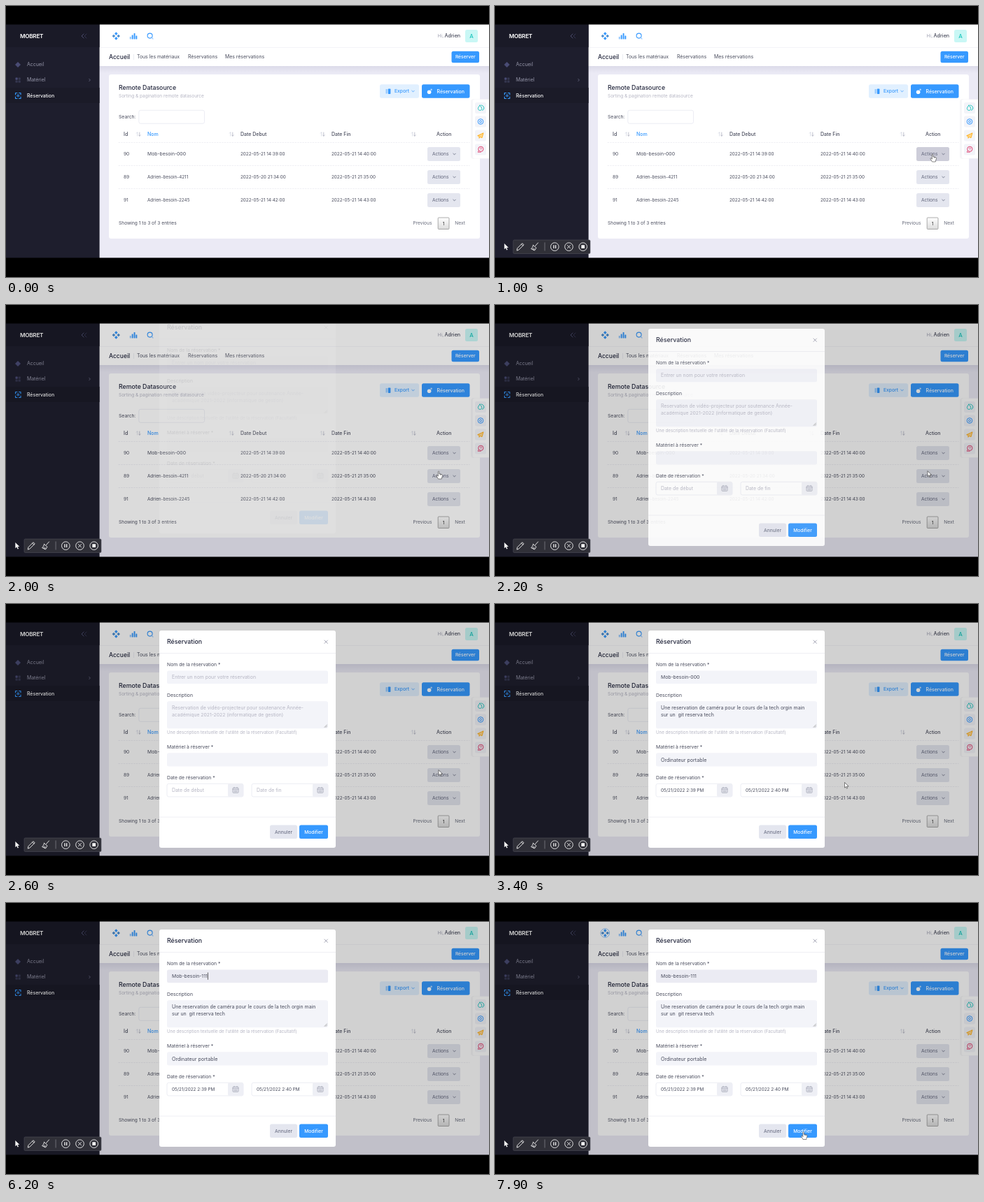
Animation of 690 by 388 pixels, one loop 8000 ms. Source, as an HTML page:

```html
<!DOCTYPE html>
<html lang="fr">
<head>
<meta charset="utf-8">
<title>Réservations</title>
<style>
html, body { margin: 0; width: 100%; height: 100%; overflow: hidden; background: #000; }
svg { display: block; width: 100%; height: 100%; }
text { font-family: Inter, "Open Sans", sans-serif; white-space: pre; }
</style>
</head>
<body>
<svg id="stage" viewBox="0 0 690 388" xmlns="http://www.w3.org/2000/svg"></svg>
<script>
const INK = '#484b5c', DARK = '#20243a', MUTED = '#b5b5c3', BLUE = '#3699ff', LINE = '#e8e9f0', GREY = '#e4e6ef', SOFT = '#f3f4f9';

const rect = (x, y, w, h, fill, r = 0, more = '') =>
  `<rect x="${x}" y="${y}" width="${w}" height="${h}" rx="${r}" fill="${fill}" ${more}/>`;
// y is the middle of the capitals
const text = (x, y, str, size = 6.8, fill = INK, weight = 400, more = '') =>
  `<text x="${x}" y="${y + size * 0.36}" font-size="${size}" fill="${fill}" font-weight="${weight}" ${more}>${str}</text>`;
const path = (d, stroke, width = 0.8, fill = 'none', more = '') =>
  `<path d="${d}" stroke="${stroke}" stroke-width="${width}" fill="${fill}" stroke-linecap="round" stroke-linejoin="round" ${more}/>`;
const dot = (x, y, r, fill, more = '') => `<circle cx="${x}" cy="${y}" r="${r}" fill="${fill}" ${more}/>`;
const ring = (x, y, r, color, w = 0.9) => dot(x, y, r, 'none', `stroke="${color}" stroke-width="${w}"`);
const chevron = (x, y, color) => path(`M${x - 1.7} ${y - 0.8}l1.7 1.7 1.7-1.7`, color);
const group = (id, body, more = '') => `<g id="${id}" ${more}>${body}</g>`;
const diamond = (x, y, r) => `M${x} ${y - r}l${r} ${r} ${-r} ${r} ${-r} ${-r}z`;

function sidebar() {
  return rect(0, 26, 133.6, 335, '#1e1e2d') + rect(0, 26, 133.6, 33, '#1a1a27') + rect(0, 117, 133.6, 22, '#1b1b28')
    + text(20, 43, 'MOBRET', 8.2, '#fff', 600, 'letter-spacing="-.3"')
    + path('M111 40l-3 3 3 3', '#5a5c82') + path('M115 40l-3 3 3 3', '#3a3c5c')
    + path(diamond(17, 84, 4), 'none', 0, '#494b74')
    + text(30, 84, 'Accueil', 6.9, '#9899ac')
    + rect(13.5, 102.5, 3.2, 3.2, '#494b74', 0.6) + rect(17.6, 102.5, 3.2, 3.2, '#34364f', 0.6)
    + rect(13.5, 106.6, 3.2, 3.2, '#34364f', 0.6) + rect(17.6, 106.6, 3.2, 3.2, '#34364f', 0.6)
    + text(30, 106, 'Matériel', 6.9, '#9899ac')
    + path('M118.7 104.3l1.7 1.7-1.7 1.7', '#6b6d86')
    + path('M13.5 127v-2.5h2.5M18.5 124.5h2.5v2.5M21 130v2.5h-2.5M16 132.5h-2.5V130', BLUE, 1.1)
    + rect(15.4, 126.6, 3.7, 3.7, BLUE, 0.7, 'opacity=".6"')
    + text(30, 128.3, 'Réservation', 6.9, '#fff', 500);
}

function header() {
  const nav = [[187, 'Tous les matériaux'], [260, 'Réservations'], [313, 'Mes réservations']];
  return rect(133, 26, 557, 60, '#fff') + rect(133, 59, 557, 0.7, '#eff0f5')
    + rect(133, 86, 557, 10, 'url(#shade)')
    + path(diamond(157.3, 39.6, 2.3) + diamond(157.3, 46.4, 2.3), 'none', 0, BLUE)
    + path(diamond(153.9, 43, 2.3) + diamond(160.7, 43, 2.3), 'none', 0, '#4c8fd0')
    + group('halo', ring(157.3, 43, 6.3, '#6fb4fb', 0.8))
    + rect(176.8, 44, 1.9, 3.6, '#8cc4ff', 0.5) + rect(179.7, 41.5, 1.9, 6.1, BLUE, 0.5)
    + rect(182.6, 39, 1.9, 8.6, BLUE, 0.5) + rect(185.4, 42.5, 1.9, 5.1, BLUE, 0.5)
    + ring(205.6, 42.6, 3.5, BLUE, 1.1) + path('M208.3 45.3l1.7 1.8', '#8cc4ff', 1.1)
    + text(616.5, 42.8, 'Hi,', 6.8, '#a1a2b3') + text(626.5, 42.8, 'Adrien', 7.2, INK, 500)
    + rect(656, 34, 18, 18, '#c9f7f5', 2.5) + text(665, 43, 'A', 7.8, '#1bc5bd', 500, 'text-anchor="middle"')
    + text(147, 73, 'Accueil', 8.5, DARK, 500) + rect(182, 69, 0.6, 8, '#e0e2ea')
    + nav.map(([x, s]) => text(x, 73, s, 6.9)).join('')
    + rect(636.5, 64.7, 39.5, 16.6, BLUE, 2.5) + text(656.2, 73, 'Réserver', 6.7, '#fff', 500, 'text-anchor="middle"');
}

const sorter = x => path(`M${x - 1.5} 186v-5.2m-1.3 1.4l1.3-1.4 1.3 1.4`, '#d5d7e2', 0.7)
  + path(`M${x + 1.8} 181v5.2m-1.3-1.4l1.3 1.4 1.3-1.4`, '#a9abba', 0.7);

function card() {
  const heads = [[168, 'Id', INK], [202, 'Nom', BLUE], [335, 'Date Debut', INK], [465, 'Date Fin', INK], [615, 'Action', INK]];
  const rows = [
    ['90', 'Mob-besoin-000', '2022-05-21 14:39:00', '2022-05-21 14:40:00'],
    ['89', 'Adrien-besoin-4211', '2022-05-20 21:34:00', '2022-05-21 21:35:00'],
    ['91', 'Adrien-besoin-2245', '2022-05-21 14:42:00', '2022-05-21 14:43:00']
  ];
  let s = rect(147, 98, 530, 235, '#fff', 3)
    + text(161, 117, 'Remote Datasource', 8.75, DARK, 500)
    + text(161, 128.5, 'Sorting &amp; pagination remote datasource', 6.5, MUTED)
    + rect(534, 112.2, 56, 19.6, '#e1f0ff', 2.5) + rect(542.5, 119, 2.4, 6.5, '#9accff', 0.5) + rect(545.8, 118.5, 3.6, 7.5, BLUE, 0.7)
    + text(555, 122, 'Export', 6.75, BLUE, 500) + chevron(581.5, 122, BLUE)
    + rect(594, 112.2, 68.5, 19.6, BLUE, 2.5) + dot(604.6, 123.3, 2.8, '#fff') + dot(607.6, 119.8, 1.2, '#b9dbff')
    + text(615.5, 122, 'Réservation', 6.95, '#fff', 500)
    + text(161, 158.3, 'Search:', 6.8)
    + rect(189.8, 149.3, 93.7, 19, '#fff', 2.5, `stroke="${GREY}" stroke-width=".7"`)
    + heads.map(([x, str, c]) => text(x, 183, str, 7, c, 500)).join('')
    + [189, 322, 452, 582].map(sorter).join('');
  rows.forEach((row, i) => {
    const y = 212 + 33 * i;
    s += path(`M161 ${y - 16.5}H662`, LINE, 0.7, 'none', 'stroke-dasharray="1.6 2"')
      + text(168, y, row[0], 6.5) + text(202, y, row[1], i ? 6.3 : 6.8)
      + text(335, y, row[2], 6.35) + text(465, y, row[3], 6.35)
      + rect(602, y - 10, 47, 20, GREY, 2.5, `id="act${i}"`)
      + text(609, y, 'Actions', 6.6, '#5e6278') + chevron(640.5, y, '#5e6278');
  });
  return s + text(161, 310.5, 'Showing 1 to 3 of 3 entries', 6.6)
    + text(581.5, 311, 'Previous', 6.6, '#666a7a') + text(641.3, 311, 'Next', 6.6, '#666a7a')
    + rect(617.2, 303, 15.8, 16.5, 'url(#page)', 1, 'stroke="#979797" stroke-width=".8"')
    + text(625.1, 311.2, '1', 6.7, '#333', 400, 'text-anchor="middle"');
}

function sidePanel() {
  const teal = '#1bc5bd', orange = '#ffa800', red = '#e0426f';
  return rect(664, 133, 30, 86, '#50507a', 4, 'opacity=".05"') + rect(667, 133.5, 26, 85, '#fff', 3)
    + [146, 165.5, 185.5, 205.5].map(y => rect(670, y - 8, 16, 16, SOFT, 2.5)).join('')
    + path('M677 142.2c-2 2.5-3 3.8-2.4 5.6 1 2.3 4.6 2.2 5.2-.4.3-1.6-1.3-3-2.8-5.2zM679 142c2.5.5 4.2 2.5 3.7 5-.3 1.3-1.2 2-2.2 2.2', teal, 1)
    + ring(678, 165.5, 3.8, BLUE, 1) + ring(678, 165.5, 1.5, BLUE, 1)
    + path('M674 185.6l8-3.8-2 7-2.5-1.3-1.5 1.8-.2-2.8z', orange, 0.8, '#ffd58a')
    + ring(678.3, 204.8, 3.6, red, 1) + path('M675 207.5l-.8 1.8h4M677.2 204c.3-1.5 2.3-1.3 2.2 0 0 .8-1 .9-1 1.8', red);
}

const calendar = x => rect(x - 4, 263.3, 8, 7, 'none', 0.8, 'stroke="#a0a2b2" stroke-width=".8"')
  + path(`M${x - 4} 265.3h8M${x - 2} 262.3v1M${x + 2} 262.3v1M${x - 2.2} 267h4.4M${x - 2.2} 268.7h4.4`, '#a0a2b2', 0.7);

const dateBox = (x, w) => rect(x, 257.3, w + 22, 18.7, '#fff', 2.5, `stroke="${GREY}" stroke-width=".7"`)
  + rect(x + w, 257.3, 22, 18.7, '#eeeff5', 2) + calendar(x + w + 11);

function modal() {
  const labels = [[87, 'Nom de la réservation *'], [131, 'Description'], [205, 'Matériel à réserver *'], [249, 'Date de réservation *']];
  const empty = text(237, 104.5, 'Entrer un nom pour votre réservation', 6.9, MUTED)
    + text(237, 148.7, 'Reservation de vidéo-projecteur pour soutenance Année-', 6.9, MUTED)
    + text(237, 158.8, 'académique 2021-2022 (informatique de gestion)', 6.8, MUTED)
    + text(237, 266.7, 'Date de début', 6.9, MUTED) + text(358, 266.7, 'Date de fin', 6.9, MUTED);
  const filled = text(237, 104.5, '', 6.85, INK, 400, 'id="value"')
    + rect(0, 99.5, 0.7, 10.3, '#222', 0, 'id="caret"')
    + text(237, 148.7, 'Une reservation de caméra pour le cours de la tech orgin main', 6.98)
    + text(237, 158.8, 'sur un  git reserva tech', 6.98)
    + text(237, 223, 'Ordinateur portable', 7.1)
    + text(237, 266.7, '05/21/2022 2:39 PM', 6.35) + text(358, 266.7, '05/21/2022 2:40 PM', 6.35);
  return rect(219, 38, 252, 311, '#fff', 3)
    + text(230, 53.7, 'Réservation', 8.8, DARK, 500)
    + path('M455 52l4.4 4.4M459.4 52l-4.4 4.4', '#8e90a3', 0.8)
    + rect(219, 70, 252, 0.7, LINE) + rect(219, 304.7, 252, 0.7, LINE)
    + labels.map(([y, s]) => text(230, y, s, 6.85)).join('')
    + rect(230, 95.5, 230, 18.7, SOFT, 2.5, 'id="field"')
    + rect(230, 139.3, 230, 39, SOFT, 2.5) + path('M455 176.5l3.5-3.5M457 176.5l1.5-1.5', '#777', 0.6)
    + text(230, 184, "Une description textuelle de l'utilité de la réservation (Facultatif)", 6.16, MUTED)
    + rect(230, 213.3, 230, 19.2, SOFT, 2.5)
    + dateBox(230, 87) + dateBox(351, 87)
    + group('empty', empty) + group('filled', filled)
    + rect(377, 316.5, 39, 19.5, GREY, 2.5) + text(396.5, 326.2, 'Annuler', 6.8, '#5e6278', 400, 'text-anchor="middle"')
    + rect(419, 316.5, 41, 19.5, BLUE, 2.5) + text(439.5, 326.2, 'Modifier', 6.7, '#fff', 500, 'text-anchor="middle"');
}

const ARROW = 'M0 0V8.3L2 6.5 3.3 9.5 4.7 8.9 3.4 6H6z';

function toolbar() {
  const w = '#f4f4f4';
  return rect(26, 335, 110, 19.5, '#303038', 1.5, 'stroke="#50505a" stroke-width=".6"')
    + path(ARROW, 'none', 0, w, 'transform="translate(13.3 340)"')
    + path('M31.3 349.7l.7-3 7-7 2.2 2.2-7 7zM37.6 341.1l2.2 2.2', w, 0.9)
    + path('M61.5 339l-4 4.5M54.5 342.5l4.5 3.8-2.5 3.7-5-2.5c1.5-.8 2.5-2.8 3-5zM53.5 348.3l1.2-1.6M55.2 349.2l1-1.5', w, 0.9)
    + rect(70.7, 338.5, 0.7, 12, '#8a8a92')
    + [85.3, 105.5, 125.7].map(x => ring(x, 344.7, 5.8, w, 0.9)).join('')
    + rect(83.3, 342.3, 1.3, 4.8, w) + rect(86, 342.3, 1.3, 4.8, w)
    + path('M103.4 342.6l4.2 4.2M107.6 342.6l-4.2 4.2', w, 0.9)
    + rect(123.3, 342.3, 4.8, 4.8, w, 0.5);
}

const cursors = {
  arrow: path(ARROW, '#333', 0.7, '#fff', 'transform="scale(.88)"'),
  beam: path('M-1.5-4.5h3M0-4.5v9M-1.5 4.5h3', '#333', 0.7),
  hand: `<g transform="scale(.92)">`
    + path('M-.9.9C-.9-.4.9-.4.9.9V4l4 1c1 .3 1.3 1 1.1 2L5.2 9.5 4.7 12H-.5L-3 7.8c-.8-1.2.5-2 1.3-1.2l.8.9z', '#444', 0.7, '#fff')
    + path('M2.4 4.4v1.5M4 4.8v1.3', '#444', 0.5) + '</g>'
};

const stage = document.getElementById('stage');
stage.innerHTML = `<defs>
  <linearGradient id="shade" x2="0" y2="1"><stop stop-color="#dcdbe9"/><stop offset="1" stop-color="#ebeaf5"/></linearGradient>
  <linearGradient id="page" x2="0" y2="1"><stop stop-color="#fff"/><stop offset="1" stop-color="#dcdcdc"/></linearGradient>
  </defs>`
  + rect(133, 26, 557, 335, '#ebeaf5') + header() + card() + sidePanel() + sidebar()
  + rect(0, 26, 690, 335, '#000', 0, 'id="veil"')
  + group('modal', modal()) + group('toolbar', toolbar())
  + group('pointer', Object.keys(cursors).map(k => group(k, cursors[k])).join(''))
  + rect(0, 0, 690, 26.5, '#000') + rect(0, 360.5, 690, 27.5, '#000');

const el = id => document.getElementById(id);
const show = (id, on) => el(id).setAttribute('visibility', on ? 'inherit' : 'hidden');
const set = (id, name, v) => el(id).setAttribute(name, v);

// rows: [time, value, ...]
const veilKeys = [[1800, 0], [1900, 0.03], [2000, 0.14], [2100, 0.17], [2200, 0.18]];
const fadeKeys = [[1900, 0], [2000, 0.12], [2100, 0.5], [2200, 0.9], [2300, 0.98], [2400, 1]];
const dropKeys = [[1900, -26], [2000, -22], [2100, -11], [2200, -4], [2300, -1], [2400, 0]];
const moves = [
  [100, 560, 300], [800, 625, 212], [1000, 625, 212], [1600, 618, 238], [3300, 618, 238],
  [3400, 499.5, 255.8], [4000, 285, 105], [7300, 285, 105], [7800, 440.5, 327.5], [8000, 440.5, 327.5]
];
const kinds = [[0, ''], [100, 'arrow'], [700, 'hand'], [2200, 'arrow'], [3900, 'beam'], [4800, ''], [7400, 'beam'], [7500, 'arrow'], [7800, 'hand']];
const edits = [[4100, '000'], [4800, '00'], [5000, '0'], [5200, ''], [5900, '1'], [6000, '11'], [6200, '111']];

const last = (keys, t) => keys.filter(k => k[0] <= t).pop() || keys[0];

function lerp(keys, t, col = 1) {
  const a = last(keys, t), b = keys[keys.indexOf(a) + 1];
  if (!b || t <= a[0]) return a[col];
  return a[col] + (b[col] - a[col]) * (t - a[0]) / (b[0] - a[0]);
}

function draw(t) {
  const focus = t >= 4100, loaded = t >= 2900;
  const fade = lerp(fadeKeys, t);
  set('veil', 'opacity', lerp(veilKeys, t));
  set('modal', 'opacity', fade);
  set('modal', 'transform', `translate(0 ${lerp(dropKeys, t)})`);
  show('modal', fade > 0);
  show('empty', !loaded);
  show('filled', loaded);
  set('act0', 'fill', t >= 900 && t < 2000 ? '#cdcdd9' : GREY);
  set('field', 'fill', focus ? '#ebebf3' : SOFT);
  show('toolbar', t >= 300);
  show('halo', t >= 7400);

  const edit = last(edits, t);
  el('value').textContent = 'Mob-besoin-' + edit[1];
  show('caret', focus && loaded && Math.floor((t - edit[0]) / 500) % 2 === 0);
  set('caret', 'x', 237.2 + el('value').getComputedTextLength());

  const kind = last(kinds, t)[1];
  for (const k in cursors) show(k, k === kind);
  set('pointer', 'transform', `translate(${lerp(moves, t, 1)} ${lerp(moves, t, 2)})`);
}

const start = performance.now();
function tick() {
  const t = (performance.now() - start) % 8000;
  draw(Math.floor(t / 100) * 100);
  requestAnimationFrame(tick);
}
tick();
</script>
</body>
</html>
```
